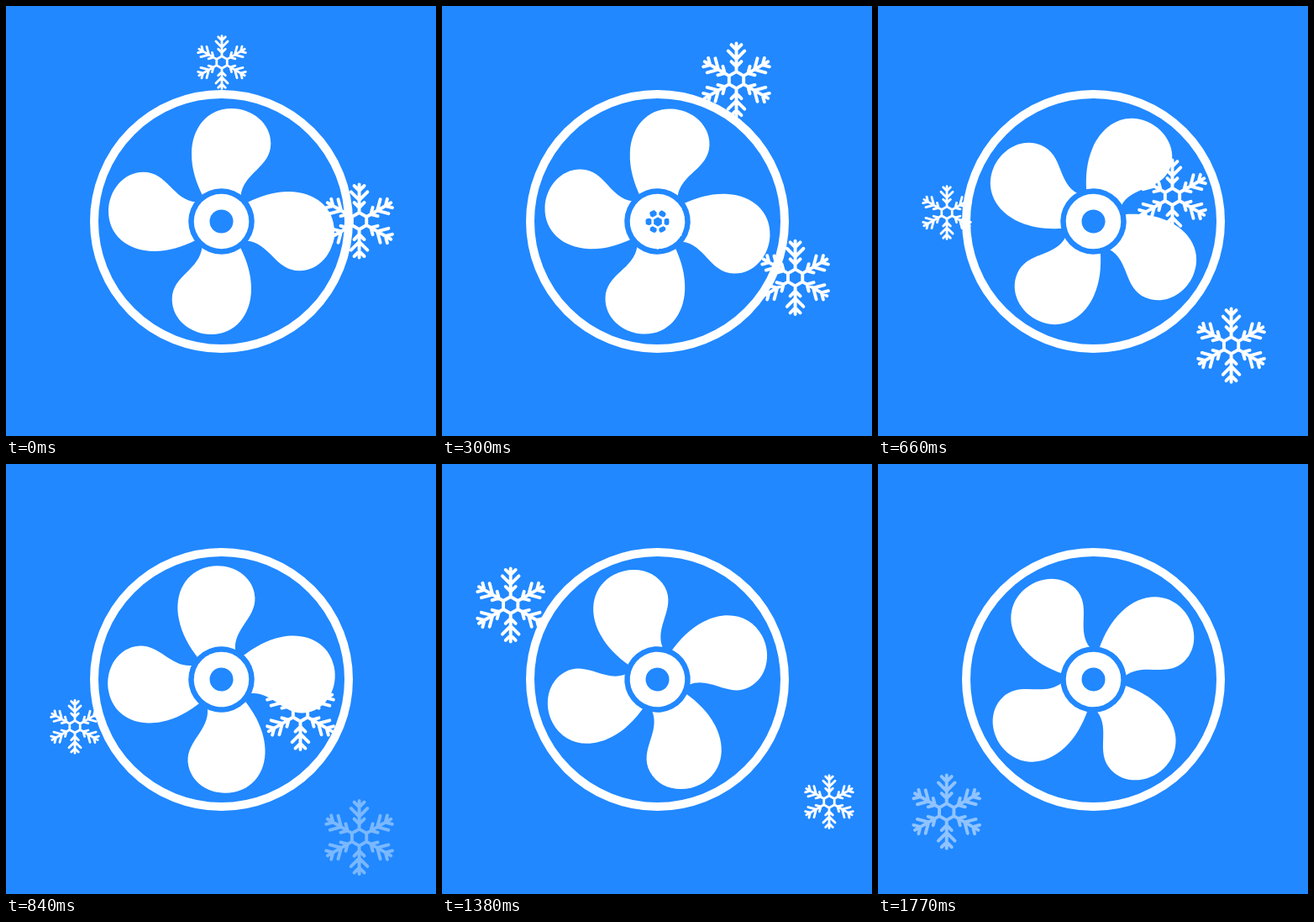
Recreate the animation shown at these times as an HTML page with a canvas. Size 512x512 px, loop 1.8 s.

```html
<!DOCTYPE html>
<html lang="en">
<head>
<meta charset="utf-8">
<title>Cooling fan</title>
<style>
  html, body { margin: 0; width: 100%; height: 100%; overflow: hidden; background: #2188ff; }
  canvas { display: block; width: 100vw; height: 100vh; }
</style>
</head>
<body>
<canvas id="stage" width="512" height="512"></canvas>
<script>
const ctx = document.getElementById('stage').getContext('2d');
const LOOP = 1800, STEP = 30, MID = 256.5;
const BLUE = '#2188ff', WHITE = '#fff';

// Fan turn: [ms, degrees]
const spin = [[0, 0], [300, 92], [660, 203.3], [840, 258.6], [1110, 349], [1380, 422.4], [1770, 496.6]];

const flakes = [
  { x: 420.6, y: 256, speed: 0.2245, from: 0, to: 900, size: 1, fade: 150 },
  { x: 257, y: 67, speed: 0.633, from: 0, to: 600, size: 0.72, fade: 60 },
  { x: 350.5, y: 76.5, speed: 0.386, from: 270, to: 1200, size: 1, fade: 150 },
  { x: 82, y: 223.8, speed: 0.371, from: 600, to: 1200, size: 0.72, fade: 60 },
  { x: 461, y: 224.1, speed: 0.371, from: 900, to: 1500, size: 0.72, fade: 60 },
  { x: 81.7, y: 54.4, speed: 0.631, from: 1200, to: 1800, size: 1, fade: 60 }
];

function slope(i) {
  const a = spin[Math.max(0, i - 1)], b = spin[Math.min(spin.length - 1, i + 1)];
  return (b[1] - a[1]) / (b[0] - a[0]);
}

// Smooth curve through the spin points
function angleAt(t) {
  let i = 0;
  while (i < spin.length - 2 && t >= spin[i + 1][0]) i++;
  const [t0, a] = spin[i], [t1, b] = spin[i + 1];
  const d = t1 - t0, u = (t - t0) / d, v = 1 - u;
  return a * (1 + 2 * u) * v * v + b * u * u * (3 - 2 * u)
    + d * u * v * (slope(i) * v - slope(i + 1) * u);
}

const blade = new Path2D('M-22-30C-30-46-35.5-62-35.5-80C-35.5-112-16-134.5 12-134.5' +
  'C37-134.5 58.8-116.5 58.8-93C58.8-64 25.5-58 23-30Z');

function makeFlake() {
  const path = new Path2D();
  for (let i = 0; i < 6; i++) {
    const c = Math.cos(i * Math.PI / 3), s = Math.sin(i * Math.PI / 3);
    const line = (...pts) => pts.forEach(([x, y], n) =>
      path[n ? 'lineTo' : 'moveTo'](x * c - y * s, x * s + y * c));
    const fork = (y, w) => line([-w, -y - w], [0, -y], [w, -y - w]);
    line([0, -10], [0, -43.6]);
    line([0, -10], [8.66, -5]);
    fork(16, 6);
    fork(24.8, 9.8);
    fork(36, 6);
  }
  return path;
}
const flakeShape = makeFlake();

function disc(r, color) {
  ctx.fillStyle = color;
  ctx.beginPath();
  ctx.arc(0, 0, r, 0, 2 * Math.PI);
  ctx.fill();
}

function drawFan(t) {
  ctx.save();
  ctx.translate(MID, MID);
  ctx.strokeStyle = WHITE;
  ctx.lineWidth = 10;
  ctx.beginPath();
  ctx.arc(0, 0, 151.5, 0, 2 * Math.PI);
  ctx.stroke();
  ctx.rotate(angleAt(t) * Math.PI / 180);
  ctx.fillStyle = WHITE;
  for (let i = 0; i < 4; i++) {
    ctx.fill(blade);
    ctx.rotate(Math.PI / 2);
  }
  disc(39.3, BLUE);
  disc(32.8, WHITE);
  disc(14, BLUE);
  ctx.restore();
}

function drawFlake(f, t) {
  if (t < f.from || t >= f.to) return;
  ctx.save();
  ctx.globalAlpha = Math.min(1, (f.to - t) / f.fade);
  ctx.translate(f.x, f.y + f.speed * (t - f.from));
  ctx.scale(f.size, f.size);
  ctx.strokeStyle = WHITE;
  ctx.lineWidth = 3.9;
  ctx.lineCap = ctx.lineJoin = 'round';
  ctx.stroke(flakeShape);
  ctx.restore();
}

const start = performance.now();
function draw(now) {
  const ms = Math.max(0, now - start) % LOOP;
  const t = Math.floor(ms / STEP) * STEP;
  ctx.fillStyle = BLUE;
  ctx.fillRect(0, 0, 512, 512);
  drawFan(t);
  flakes.forEach(f => drawFlake(f, t));
  requestAnimationFrame(draw);
}
draw(start);
</script>
</body>
</html>
```
